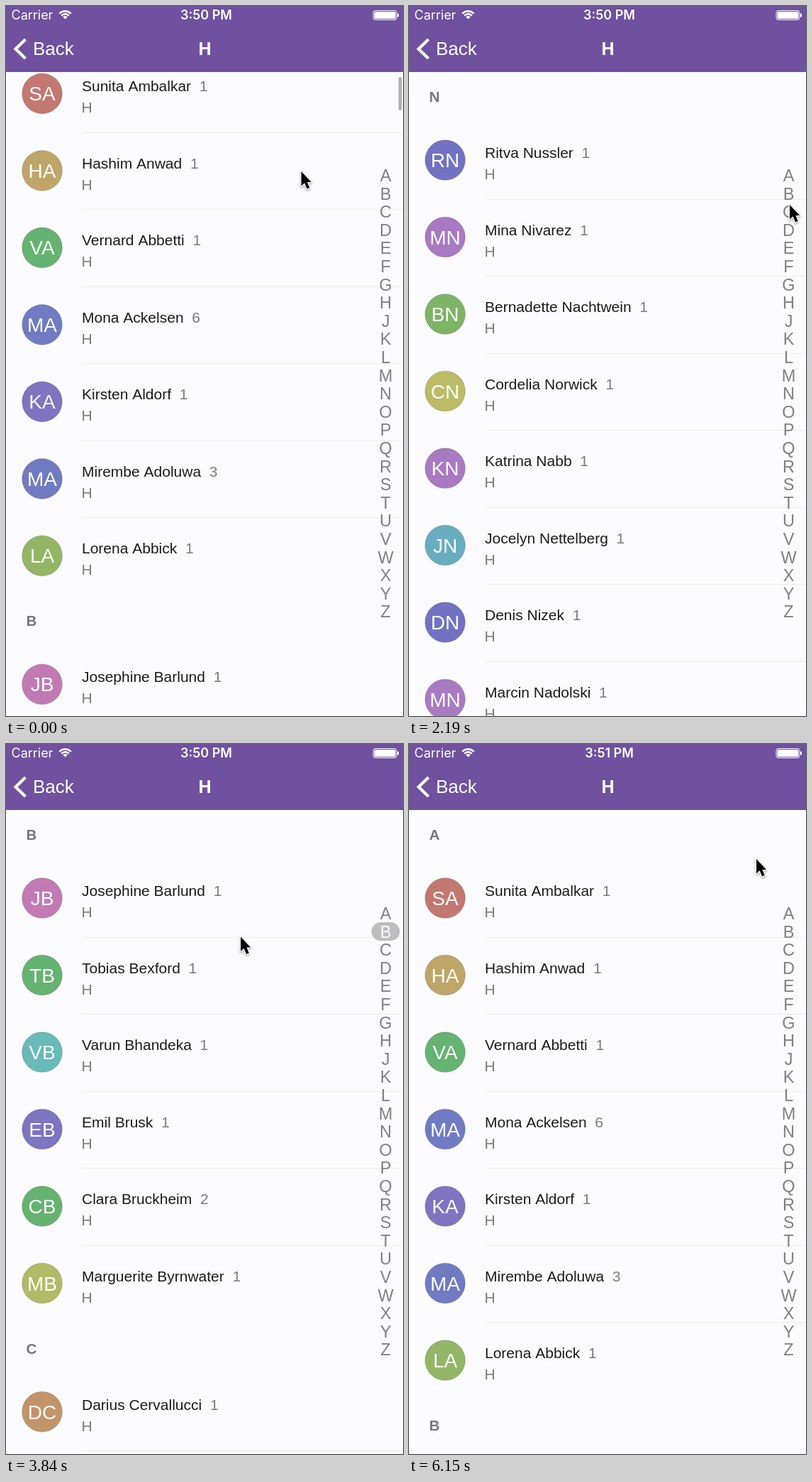
These frames come from a looping animation (560x1000 px, 6.18 s). An HTML page with a canvas:

```html
<!DOCTYPE html>
<html lang="en">
<head>
<meta charset="utf-8">
<title>Contact list with letter index</title>
<style>
html, body { margin: 0; width: 100%; height: 100%; overflow: hidden; background: #fcfcfe; }
canvas { display: block; width: 560px; height: 1000px; }
</style>
</head>
<body>
<canvas id="stage"></canvas>
<script>
const W = 560, H = 1000, LOOP = 6180;
const NAV = 93, ROW = 108.5, HEAD = 72.5;
const SANS = '"Liberation Sans", Arial, sans-serif';
const STATUS = 'Inter, sans-serif';
const LETTERS = 'ABCDEFGHJKLMNOPQRSTUVWXYZ';
const INDEX_X = 535.5, INDEX_TOP = 238.5, INDEX_STEP = 25.6;

const canvas = document.getElementById('stage');
const ratio = window.devicePixelRatio || 1;
canvas.width = W * ratio;
canvas.height = H * ratio;
const c = canvas.getContext('2d');
c.scale(ratio, ratio);

// Each contact: name, count, avatar hue
const contacts = {
  A: 'Sunita Ambalkar,1,5|Hashim Anwad,1,41|Vernard Abbetti,1,129|Mona Ackelsen,6,232|Kirsten Aldorf,1,249|Mirembe Adoluwa,3,232|Lorena Abbick,1,86',
  B: 'Josephine Barlund,1,311|Tobias Bexford,1,129|Varun Bhandeka,1,178|Emil Brusk,1,247|Clara Bruckheim,2,127|Marguerite Byrnwater,1,67',
  C: 'Darius Cervallucci,1,28',
  E: 'June Ervik,2,41|Jonas Ellwein,1,41',
  F: 'Konstance Fell,2,309|Kurt Fenster,2,309|Marcella Fennix,2,192|Antonia Fulke,1,118|Pavlos Farmakou,1,340',
  H: 'Zeki Hobar,1,128|Jasper Hollvik,1,192|Mina Hulst,1,199|Gerhard Hultzner,1,211|Stipe Hovac,4,20|Pauli Hennewerk,1,70|Ernestina Hult,1,20|Auguste Hagenwiese,2,339',
  N: 'Ritva Nussler,1,240|Mina Nivarez,1,279|Bernadette Nachtwein,1,101|Cordelia Norwick,1,60|Katrina Nabb,1,279|Jocelyn Nettelberg,1,192|Denis Nizek,1,240|Marcin Nadolski,1,279',
  Q: 'Ernestine Quellard,1,192',
  R: 'Sami Rufaz,7,11|Fiorenza Rovelini,1,273|Pieter Rusk,1,228|Leonora Rill,1,170|Maurice Rowde,1,138|Delia Rigando,1,258'
};
const firstNames = ['Martha', 'Oskar', 'Lena', 'Gideon', 'Adele', 'Bruno', 'Tessa', 'Nolan'];
const endings = ['anwell', 'elbrook', 'indorf', 'orbeck', 'ullen', 'averick', 'ostvik'];

function inventContacts(letter, n) {
  const stem = 'OU'.includes(letter) ? letter + 'r' : letter;
  return Array.from({ length: 4 + n * 7 % 5 }, (_, i) => ({
    name: firstNames[(n * 3 + i * 5) % 8] + ' ' + stem + endings[(n + i) % 7],
    count: i % 4 ? 1 : 2,
    hue: (n * 67 + i * 101) % 360
  }));
}

function parseContacts(text) {
  return text.split('|').map(entry => {
    const [name, count, hue] = entry.split(',');
    return { name, count, hue: +hue };
  });
}

let listHeight = 0;
const sections = [...LETTERS].map((letter, n) => {
  const rows = contacts[letter] ? parseContacts(contacts[letter]) : inventContacts(letter, n);
  if (letter === 'C' || letter === 'R') rows.push(...inventContacts(letter, n));
  const section = { letter, rows, top: listHeight };
  listHeight += HEAD + rows.length * ROW;
  return section;
});
const maxScroll = listHeight - (H - NAV);

// Pointer path: time, x, y
const path = [
  [0, 416.5, 233], [250, 420, 232], [900, 535, 318], [1110, 535.5, 345],
  [1550, 537, 546], [1780, 537, 546], [2190, 537, 280], [2400, 536, 262],
  [2850, 400, 500], [3270, 318.5, 412], [3840, 331, 271.5], [4350, 350, 440],
  [4890, 373, 623.5], [5150, 385, 630], [5700, 460, 238], [5850, 475, 220], [6150, 490, 162], [LOOP, 490, 162]
];
const clamp = (v, lo, hi) => Math.min(hi, Math.max(lo, v));
const mix = (a, b, k) => a + (b - a) * k;

function pointerAt(t) {
  const i = path.findIndex((p, n) => n && t <= p[0]);
  const [t0, x0, y0] = path[i - 1], [t1, x1, y1] = path[i];
  const u = (t - t0) / (t1 - t0), k = u * u * (3 - 2 * u);
  return { x: mix(x0, x1, k), y: mix(y0, y1, k) };
}

const letterAt = y => clamp(Math.round((y - INDEX_TOP) / INDEX_STEP), 0, LETTERS.length - 1);

function stateAt(t) {
  const pointer = pointerAt(t);
  const flick = 1 - Math.pow(1 - clamp(t / 500, 0, 1), 3);
  if (t < 950) return { pointer, scroll: 93.5 + 24 * flick, bar: clamp((800 - t) / 250, 0, 1), active: -1 };
  const dragging = t >= 2400 && t < 5850;
  let current;
  if (t < 1700) current = letterAt(pointer.y);
  else if (t < 2400) current = LETTERS.indexOf('N');
  else current = dragging ? letterAt(pointer.y) : 0;
  return { pointer, scroll: Math.min(sections[current].top, maxScroll), bar: 0, active: dragging ? current : -1 };
}

function text(str, x, y, font, color, align = 'left') {
  c.font = font;
  c.fillStyle = color;
  c.textAlign = align;
  c.fillText(str, x, y);
}

function roundRect(x, y, w, h, r, color) {
  c.fillStyle = color;
  c.beginPath();
  c.roundRect(x, y, w, h, r);
  c.fill();
}

// Greens and magentas are a little more muted than the other hues.
function avatarColor(hue) {
  const near = center => Math.max(0, Math.cos((hue - center) * Math.PI / 180));
  const green = near(120), magenta = near(300);
  return `hsl(${hue} ${43 - 9 * green - 6 * magenta}% ${59 - 4 * green + 3 * magenta}%)`;
}

function drawRow({ name, count, hue }, y, last) {
  c.beginPath();
  c.arc(51, y, 28.3, 0, 7);
  c.fillStyle = avatarColor(hue);
  c.fill();
  c.strokeStyle = 'rgba(60,50,40,.16)';
  c.lineWidth = 1.5;
  c.stroke();
  const initials = name.split(' ').map(word => word[0]).join('');
  text(initials, 51, y + 10, '28px ' + SANS, '#fff', 'center');
  text(name, 107, y - 3, '21px ' + SANS, '#1b1b1b');
  const countX = 107 + c.measureText(name + '  ').width;
  text(count, countX, y - 3, '21px ' + SANS, '#7b7b7d');
  text('H', 106.5, y + 27, '21px ' + SANS, '#7b7b7d');
  if (!last) {
    c.fillStyle = '#ececed';
    c.fillRect(107, Math.round(y + 54.5), W - 107, 1);
  }
}

function drawList(scroll) {
  for (const { letter, rows, top } of sections) {
    const y = NAV + top - scroll;
    if (y > H || y + HEAD + rows.length * ROW < NAV) continue;
    text(letter, 28.5, y + 42, 'bold 20.5px ' + SANS, '#767678');
    rows.forEach((row, i) => {
      const center = y + HEAD + 51.5 + i * ROW;
      if (center > 0 && center < H + 40) drawRow(row, center, i === rows.length - 1);
    });
  }
}

function drawIndex(active) {
  [...LETTERS].forEach((letter, i) => {
    const y = INDEX_TOP + i * INDEX_STEP;
    if (i === active) roundRect(515.5, y - 13, 40, 26, 13, '#bebec0');
    text(letter, INDEX_X, y + 8.4, '23.5px ' + SANS, i === active ? '#fff' : '#808082', 'center');
  });
}

function drawNav(t) {
  c.fillStyle = '#6f519f';
  c.fillRect(0, 0, W, NAV);
  text('Carrier', 7.5, 19, '18px ' + STATUS, '#fff');
  text(t < 4400 ? '3:50 PM' : '3:51 PM', 282.5, 19, '600 18px ' + STATUS, '#fff', 'center');

  // Wi-Fi
  c.strokeStyle = c.fillStyle = '#fff';
  c.lineWidth = 2.4;
  for (const r of [11.3, 7.2]) {
    c.beginPath();
    c.arc(83.5, 18.5, r, -Math.PI * .76, -Math.PI * .24);
    c.stroke();
  }
  c.beginPath();
  c.moveTo(83.5, 18.5);
  c.arc(83.5, 18.5, 4.4, -Math.PI * .76, -Math.PI * .24);
  c.fill();

  // Battery
  c.lineWidth = 1;
  c.beginPath();
  c.roundRect(518, 6.5, 33, 13, 3);
  c.stroke();
  roundRect(519.5, 8, 30, 10, 1.5, '#fff');
  roundRect(552, 10.5, 2, 5, 1, '#fff');

  // Back button and title
  c.lineWidth = 4.2;
  c.beginPath();
  c.moveTo(27.5, 47);
  c.lineTo(13.5, 60.5);
  c.lineTo(27.5, 74);
  c.stroke();
  text('Back', 38, 69.3, '26px ' + SANS, '#fff');
  text('H', 280.5, 69, 'bold 25px ' + SANS, '#fff', 'center');
}

const arrow = new Path2D('M0 0V20.5L4.6 16.3L8 24.6L11.8 23L8.4 14.9H14.2Z');
function drawPointer({ x, y }) {
  c.save();
  c.translate(x, y);
  c.shadowColor = 'rgba(0,0,0,.35)';
  c.shadowBlur = 3;
  c.shadowOffsetY = 1.5;
  c.strokeStyle = '#fff';
  c.lineWidth = 2.6;
  c.lineJoin = 'round';
  c.stroke(arrow);
  c.shadowColor = 'transparent';
  c.fillStyle = '#000';
  c.fill(arrow);
  c.restore();
}

function draw(t) {
  const { pointer, scroll, bar, active } = stateAt(t);
  c.fillStyle = '#fcfcfe';
  c.fillRect(0, 0, W, H);
  drawList(scroll);
  drawIndex(active);
  if (bar) roundRect(553.7, 95.2 + scroll * .052, 4.6, 47, 2.3, `rgba(0,0,0,${.3 * bar})`);
  drawNav(t);
  drawPointer(pointer);
}

const start = performance.now();
function tick() {
  draw((performance.now() - start) % LOOP);
  requestAnimationFrame(tick);
}
tick();
</script>
</body>
</html>
```
